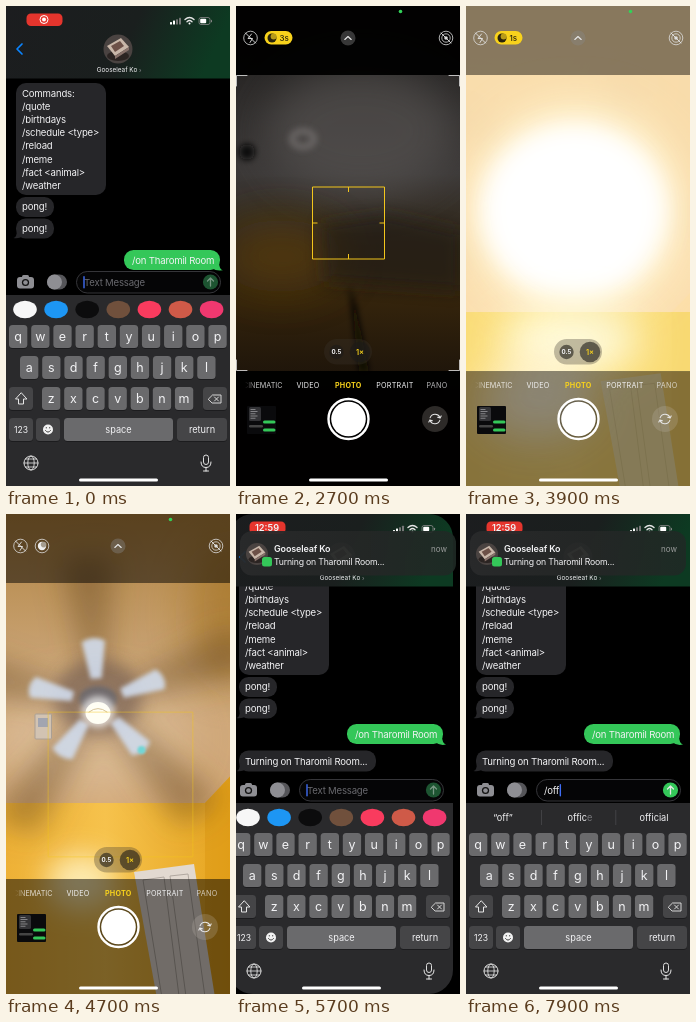
An HTML page for the animation above (8 s loop, 224 px wide and 480 px high).

```html
<!DOCTYPE html>
<html lang="en">
<head>
<meta charset="utf-8">
<title>Remote light switch</title>
<style>
html, body { margin: 0; width: 100%; height: 100%; overflow: hidden; background: #000; }
svg { display: block; width: 100vw; height: 100vh; }
text { font-family: Inter, Roboto, "Liberation Sans", sans-serif; fill: #f2f2f4; white-space: pre; }
.mid { text-anchor: middle; }
.body { font-size: 9.6px; letter-spacing: -.2px; }
.line { fill: none; stroke: #e6e6e6; stroke-linecap: round; stroke-linejoin: round; }
</style>
</head>
<body>
<svg id="stage" viewBox="0 0 224 480" preserveAspectRatio="none"></svg>
<script>
const LOOP = 8000, GAP = 239;
const DEVICE = 'Gooseleaf Ko', ROOM = 'Tharomil Room';
const $ = id => document.getElementById(id);

const rect = (x, y, w, h, r, fill, more = '') =>
  `<rect x="${x}" y="${y}" width="${w}" height="${h}" rx="${r}" fill="${fill}" ${more}/>`;
const oval = (x, y, rx, ry, fill, more = '') =>
  `<ellipse cx="${x}" cy="${y}" rx="${rx}" ry="${ry}" fill="${fill}" ${more}/>`;
const dot = (x, y, r, fill, more) => oval(x, y, r, r, fill, more);
const soft = (x, y, rx, ry, fill, blur, alpha = 1) =>
  oval(x, y, rx, ry, fill, `filter="url(#b${blur})" opacity="${alpha}"`);
const line = (d, w = 1, more = '') => `<path class="line" d="${d}" stroke-width="${w}" ${more}/>`;
const text = (x, y, s, size, more = '') => `<text x="${x}" y="${y}" font-size="${size}" ${more}>${s}</text>`;
const mid = (x, y, s, size, more = '') => text(x, y, s, size, `class="mid" ${more}`);
const body = (x, y, s, more = '') => text(x, y, s, 9.6, `class="body" ${more}`);
const group = (id, inner, more = '') => `<g id="${id}" ${more}>${inner}</g>`;
const homeBar = rect(73, 472.5, 79, 3, 1.5, '#fff');

// Messages
const GREY = '#262629', GREEN = '#34c759';

const photo = (x, y, s) => `<g transform="translate(${x} ${y}) scale(${s})">
  ${dot(0, 0, 14.5, '#4a4341')}${oval(0, 7, 11, 5, '#2b2422')}
  <path d="M-11-3L3-11 11-2-3 7Z" fill="#c9b7a9"/><path d="M-7-3L2-8 6-3-3 3Z" fill="#6d5148"/>
  <path d="M-3 7L11-2V1L-3 10Z" fill="#87716a"/></g>`;

function messages() {
  const commands = ['Commands:', '/quote', '/birthdays', '/schedule &lt;type&gt;', '/reload', '/meme',
    '/fact &lt;animal&gt;', '/weather'];
  const tail = (y) => `<path d="M11 ${y - 8}Q11 ${y - 1} 7.5 ${y}Q14 ${y + 1} 18 ${y - 3}Z" fill="${GREY}"/>`;
  return rect(10, 77, 90, 112, 10, GREY)
    + commands.map((c, i) => body(16, 90.5 + 13.2 * i, c)).join('')
    + rect(10, 191, 38, 20, 9.5, GREY) + body(16, 204, 'pong!')
    + rect(10, 212.5, 38, 20, 9.5, GREY) + tail(232) + body(16, 225.5, 'pong!')
    + group('sent', rect(118, 238, 96, 20, 9.5, GREEN)
      + `<path d="M213 250Q213 257 217 258.500Q211 260 206 256Z" fill="${GREEN}"/>` + body(126, 251.5, `/on ${ROOM}`))
    + group('reply', rect(10, 264.5, 137, 21, 9.5, GREY) + tail(285) + body(16, 278.5, `Turning on ${ROOM}...`));
}

const status = group('recIcon', dot(38, 13.5, 4, 'none', 'stroke="#fff"') + dot(38, 13.5, 2, '#fff'))
  + group('clock', mid(38, 17, '12:59', 9.2, 'font-weight="600"'));

const header = rect(0, 0, 224, 72.5, 0, 'url(#head)')
  + rect(20.5, 7.5, 36, 12.5, 4.5, '#e5352d') + status
  + [0, 1, 2, 3].map(i => rect(164 + i * 3, 16 - i * 1.4, 2, 2.4 + i * 1.4, .5, i < 2 ? '#fff' : '#777')).join('')
  + line('M179 13.500Q183.500 9.500 188 13.500', 1.4) + line('M181 15.700Q183.500 13.500 186 15.700', 1.4) + dot(183.5, 17.5, 1, '#fff')
  + rect(193, 11.5, 11, 7, 2, 'none', 'stroke="#888" stroke-width=".8"') + rect(194.2, 12.7, 6, 4.6, 1, '#fff') + rect(205, 13.7, 1, 2.6, .5, '#888')
  + line('M16 38L11 43 16 48', 1.7, 'style="stroke:#0a84ff"') + photo(112, 43, 1)
  + mid(111, 66.3, DEVICE, 6.4) + text(133, 66, '›', 6.4, 'style="fill:#8e8e93"');

const input = rect(0, 264.5, 224, 25, 0, '#000')
  + rect(11, 271, 17, 11.5, 3, '#8e8e93') + rect(16, 269, 7, 4, 1.5, '#8e8e93') + dot(19.5, 276.5, 3.6, '#111') + dot(19.5, 276.5, 2.3, '#8e8e93')
  + rect(41, 268.5, 20, 15, 7.5, '#555559') + dot(48.5, 276, 7.5, '#8e8e93')
  + rect(70.5, 265.5, 144, 21.5, 10.7, '#050506', 'stroke="#3c3c40" stroke-width=".9"')
  + body(78, 279.7, 'Text Message', 'id="hint" style="fill:#69696e"') + body(78, 279.7, '', 'id="typed"')
  + rect(77, 270, 1.4, 12.5, .7, '#3f6df5', 'id="caret"')
  + dot(204.5, 276, 7.6, GREEN, 'id="send"') + line('M204.500 280V272.300M201.500 275L204.500 272 207.500 275', 1.3, 'id="arrow"');

// Keyboard
const LIGHT = '#6a6a6c', DARK = '#454547';
const key = (x, y, w, fill, label = '', size = 9) =>
  rect(x, y + .8, w, 23, 3.5, '#18181a') + rect(x, y, w, 23, 3.5, fill) + mid(x + w / 2, y + 11.5 + size * .35, label, size);
const row = (chars, x, y, pitch = 22.15, w = 18.4) =>
  [...chars].map((c, i) => key(x + i * pitch, y, w, LIGHT, c === '&' ? '&amp;' : c, 12.5)).join('');

const letters = row('qwertyuiop', 3, 319) + row('asdfghjkl', 14, 350) + row('zxcvbnm', 36, 381)
  + key(3, 381, 24, DARK) + line('M15 387L9.500 393H12.500V398H17.500V393H20.500Z') + key(3, 412, 24, DARK, '123', 8.6);
const symbols = row('1234567890', 3, 319) + row('-/:;()$&@”', 3, 350) + row('.,?!’', 36, 381, 31.5, 27)
  + key(3, 381, 24, DARK, '#+=', 7.5) + key(3, 412, 24, DARK, 'ABC', 8.6);
const sharedKeys = key(197, 381, 24, DARK) + line('M202.500 393L206.500 389H215V397H206.500ZM208.500 391L212.500 395M212.500 391L208.500 395', .9)
  + key(30, 412, 24, DARK) + dot(42, 423.5, 5, '#f2f2f2') + line('M39.500 424.500Q42 428 44.500 424.500M40.300 421.500V422M43.700 421.500V422', 1, 'style="stroke:#444"')
  + key(58, 412, 109, LIGHT, 'space', 9.2) + key(171, 412, 50, DARK, 'return', 9.2);

const strip = ['#f7f7f7', '#1d96f4', '#0c0c0d', '#70503c', '#f93b5e', '#cf5a48', '#f0386f']
  .map((c, i) => oval(19 + i * 31.1, 303.5, 11.8, 8.7, c)).join('');
const hints = mid(37, 306.5, '“off”', 9.2) + mid(114, 306.5, 'offic<tspan fill="#77777a">e</tspan>', 9.2) + mid(188, 306.5, 'official', 9.2)
  + rect(75, 296, .7, 15, 0, '#4d4d50') + rect(149.5, 296, .7, 15, 0, '#4d4d50');

const keyboard = rect(0, 289, 224, 191, 0, '#2a2a2c') + group('strip', strip) + group('hints', hints)
  + group('letters', letters) + group('symbols', symbols) + sharedKeys + group('popup', '')
  + dot(25, 457, 7, 'none', 'stroke="#ddd"') + oval(25, 457, 3.2, 7, 'none', 'stroke="#ddd" stroke-width=".9"')
  + line('M18 457H32M19.500 453H30.500M19.500 461H30.500', .8)
  + rect(197.5, 449, 5, 9.5, 2.5, 'none', 'stroke="#ddd"') + line('M195 456Q195 461.500 200 461.500T205 456M200 461.500V465M197.500 465H202.500');

function popup(c, x, y) {
  return `<path fill="#6f6f71" d="M${x - 9} ${y + 23}V${y + 4}C${x - 9} ${y - 4} ${x - 16} ${y - 4} ${x - 16} ${y - 10}V${y - 31}
    q0-6 6-6h20q6 0 6 6V${y - 10}C${x + 16} ${y - 4} ${x + 9} ${y - 4} ${x + 9} ${y + 4}V${y + 23}Z"/>` + mid(x, y - 13, c, 21);
}

// Camera
const blades = (r1, r2, w1, w2) => [0, 1, 2, 3, 4].map(i =>
  `<path transform="rotate(${i * 72})" d="M${r1} ${-w1}L${r2 - 4} ${-w2}Q${r2 + 3} 0 ${r2 - 4} ${w2}L${r1} ${w1}Z"/>`).join('');
const tilted = inner => `<g transform="translate(92 188) scale(1.08 .98)">${inner}</g>`;

const darkScene = rect(-20, 0, 264, 480, 0, 'url(#night)')
  + soft(125, 125, 95, 65, '#5a5654', 20, .6) + soft(45, 250, 62, 36, '#5a3d10', 20, .7)
  + `<path d="M85 218L150 208 224 225V285L88 275Z" fill="#211a16" filter="url(#b8)" opacity=".6"/>`
  + oval(67, 133, 11, 8, 'none', 'stroke="#7a7674" stroke-width="6" filter="url(#b3)" opacity=".7"')
  + soft(11, 146, 8, 8, '#0b0a0a', 3)
  + `<path d="M113 278L120 300 133 366H123Z" fill="#0b0806" filter="url(#b3)"/>`;

const room = rect(-40, -60, 310, 600, 0, 'url(#ceiling)') + soft(228, 100, 45, 75, '#a06d17', 20, .55)
  + soft(85, 225, 100, 55, '#e0c3a0', 20, .65)
  + `<path d="M-40 289H199L270 214V560H-40Z" fill="url(#wall)"/><path d="M199 289L270 214V560H199Z" fill="#dc9812" opacity=".5"/>`
  + soft(75, 368, 34, 28, '#fff3c4', 14, .85)
  + `<path d="M128 358L188 350 210 490H152Z" fill="#e2d9d0"/><path d="M137 366L158 363 174 490H157ZM164 362L182 360 200 490H181Z" fill="none" stroke="#b1a8a0"/>`;
const vent = rect(29, 200, 16.5, 25, 1, '#d2c3b2', 'stroke="#aa9f94"') + rect(32, 204, 10, 9, 0, '#a2a5b0');
const shadows = tilted(group('shade', blades(20, 150, 8, 24), 'fill="#5c3d14" opacity=".42" filter="url(#b14)"'))
  + soft(92, 183, 44, 38, '#5d4a45', 8, .5) + vent;
const fan = tilted(group('blades', blades(24, 66, 5, 11), 'fill="#d2def0" opacity=".88" filter="url(#b2)"'))
  + soft(92, 185, 19, 13, '#706a6c', 2) + soft(92, 198, 17, 16, '#fff', 3, .65) + oval(92, 199, 12.5, 11, '#fffef4')
  + line('M83 198Q92 191 101 198', 1, 'style="stroke:#d7c49a"') + soft(135.5, 236, 4, 4, '#72d6d6', 1);
const glow = rect(0, 0, 224, 306, 0, '#fee4b4', 'opacity=".93"') + rect(0, 306, 224, 174, 0, '#fce48a', 'opacity=".68"')
  + soft(110, 205, 105, 108, '#fff2cc', 20) + soft(108, 202, 88, 78, '#fff', 14) + soft(108, 208, 86, 84, '#fff', 14)
  + rect(0, 306, 224, 60, 0, '#fce684', 'opacity=".45"')
  + soft(104, 335, 70, 34, '#fffbdc', 20) + soft(70, 395, 60, 42, '#fff6e4', 20, .75);

const litScene = group('room', room) + group('shadows', shadows) + rect(0, 0, 224, 480, 0, '#000', 'id="dim"')
  + group('fan', fan) + group('glow', glow);

const focus = group('focus', '<path d="M-36-36H36V36H-36Z" vector-effect="non-scaling-stroke"/>'
  + '<path id="ticks" d="M0-36V-31M0 36V31M-36 0H-31M36 0H31"/>', 'fill="none" stroke="#f3c61c"');
const off = (x, inner) => dot(x, 32, 6.8, 'none', 'stroke="#ddd" stroke-width=".8"') + inner + line(`M${x - 5} 27L${x + 5} 37`, .9);
const mode = (x, s, more = '') => mid(x, 381.6, s, 7.2, `letter-spacing=".25" ${more}`);

const camera = rect(0, 0, 224, 480, 0, '#000') + group('dark', darkScene) + group('lit', litScene)
  + group('bars', rect(0, 0, 224, 69, 0, '#000') + rect(0, 365, 224, 115, 0, '#000'))
  + group('corners', line('M.5 80V69.500H11M213 69.500H223.500V80M.5 354V364.500H11M213 364.500H223.500V354', .8)) + focus
  + off(14.5, line('M15.500 28L12 32.500H16.500L14 36.500', .9))
  + group('badge', rect(28.5, 25, 28, 13.5, 6.7, '#f8d21c') + dot(36, 32, 4.5, '#28230c') + dot(37.6, 30.6, 3, '#b89b18') + text(43.5, 35, '', 8, 'id="secs" style="fill:#28230c" font-weight="500"'))
  + group('moon', dot(36, 32, 6.8, 'none', 'stroke="#ddd" stroke-width=".8"') + dot(36, 32, 4.2, '#eee') + dot(37.6, 30.6, 2.8, '#a59d90'))
  + dot(112, 32, 7.5, '#888', 'opacity=".4"') + line('M108.800 33.500L112 30.500 115.200 33.500', 1.1)
  + off(210, dot(210, 32, 4.2, 'none', 'stroke="#ddd" stroke-width=".8"') + dot(210, 32, 1.8, '#ddd')) + dot(164.5, 5.5, 1.8, '#32d158')
  + rect(88, 333, 48, 25.5, 12.7, '#3c3630', 'opacity=".32"') + dot(100.5, 346, 7.2, '#1c1a18', 'opacity=".6"') + dot(124, 346, 10.3, '#1c1a18', 'opacity=".6"')
  + mid(100.5, 348.3, '0.5', 6.2, 'font-weight="700"') + mid(124, 348.6, '1×', 7.4, 'style="fill:#f8d21c" font-weight="600"')
  + text(46.5, 381.6, 'CINEMATIC', 7.2, 'text-anchor="end" style="fill:url(#fadeIn)"')
  + mode(72, 'VIDEO') + mode(112.3, 'PHOTO', 'style="fill:#f8d21c" font-weight="700"') + mode(159, 'PORTRAIT') + mode(201, 'PANO', 'opacity=".75"')
  + dot(112.5, 413, 20, '#000', 'fill-opacity=".25" stroke="#fff" stroke-width="2.4"') + dot(112.5, 413, 17.3, '#fff')
  + rect(11, 400, 29, 28, 1, '#0a0a0c') + rect(13, 401, 12, 14, 1.5, '#333336')
  + [0, 1, 2, 3, 4].map(i => rect(14.5, 403 + i * 2.2, 5 + i * 2 % 4, .8, 0, '#99999c')).join('')
  + rect(27, 414.5, 12.5, 3, 1.5, GREEN) + rect(13, 419, 14, 2.5, 1.2, '#444') + rect(27, 422.5, 12.5, 3, 1.5, GREEN)
  + dot(199, 413, 13, '#c8c0b8', 'opacity=".22"')
  + '<g transform="translate(199 413) scale(.88)">' + line('M-5.500-1.500A6 6 0 0 1 5.500-2M5.500 1.500A6 6 0 0 1-5.500 2M3-2L5.800-1 7-3.500M-3 2L-5.800 1-7 3.500', 1.2) + '</g>'
  + homeBar;

const banner = group('banner', rect(4, 17, 216, 44.5, 12, 'url(#note)') + photo(21, 40, .76) + rect(26, 43, 10, 9.5, 2.5, GREEN)
  + text(38, 38.3, DEVICE, 9, 'font-weight="600" letter-spacing="-.15"') + text(38, 50.6, `Turning on ${ROOM}...`, 8.7, 'letter-spacing="-.2"')
  + text(211, 38, 'now', 8, 'text-anchor="end" style="fill:#9a9c9b"'));

const blur = n => `<filter id="b${n}" x="-60%" y="-60%" width="220%" height="220%"><feGaussianBlur stdDeviation="${n}"/></filter>`;
const grad = (id, dir, ...stops) => `<linearGradient id="${id}" x1="0" y1="0" ${dir}>` + stops.map(([o, c, a = 1]) =>
  `<stop offset="${o}" stop-color="${c}" stop-opacity="${a}"/>`).join('') + '</linearGradient>';
const ACROSS = 'x2="1" y2="0"', DOWN = 'x2="0" y2="1"';

$('stage').innerHTML = `<defs>${[1, 2, 3, 8, 14, 20].map(blur).join('')}
  ${grad('head', 'x2="1" y2=".15"', [0, '#1c1d1f'], [.6, '#1a1f1e'], [1, '#0d3a22'])}
  ${grad('note', ACROSS, [0, '#292a2b', .96], [.6, '#242726', .94], [1, '#1f2a25', .9])}
  ${grad('night', DOWN, [.1, '#262423'], [.35, '#3c3938'], [.5, '#2f2516'], [.62, '#33230c'], [.8, '#1a120a'])}
  ${grad('ceiling', DOWN, [.1, '#b5843d'], [.22, '#bd935a'], [.38, '#cda87c'], [.58, '#d2a877'])}
  ${grad('wall', ACROSS, [.13, '#eeb136'], [.45, '#f6c24c'], [.85, '#e6a41f'])}
  ${grad('fadeIn', ACROSS, [.05, '#fff', 0], [.35, '#fff', .8])}
  <clipPath id="card"><rect id="cardShape" width="224" height="480"/></clipPath></defs>`
  + rect(0, 0, 224, 480, 0, '#000')
  + group('chat', rect(0, 0, 224, 480, 0, '#000') + group('list', messages()) + header + input + keyboard + homeBar, 'clip-path="url(#card)"')
  + group('cam', camera, 'clip-path="url(#card)"') + banner;

// Motion
const at = (t, ...keys) => {
  if (t <= keys[0][0]) return keys[0][1];
  for (let i = 1; i < keys.length; i++) {
    const [t0, a] = keys[i - 1], [t1, b] = keys[i];
    if (t < t1) return a + (b - a) * (t - t0) / (t1 - t0);
  }
  return keys[keys.length - 1][1];
};
const set = (id, name, v) => $(id).setAttribute(name, v);
const move = (id, x, y) => set(id, 'transform', `translate(${x} ${y})`);
const show = (id, on) => set(id, 'opacity', +on);

function drawChat(t) {
  const back = t >= 5600, typed = t < 6700 ? '' : '/off'.slice(0, t < 7500 ? 1 : t < 7700 ? 2 : t < 7900 ? 3 : 4);
  move('list', 0, back ? -28 : 0);
  move('sent', 0, t < 100 ? 6 : 0);
  show('reply', back);
  show('recIcon', !back);
  show('clock', back);
  $('typed').textContent = typed;
  show('hint', !typed);
  set('caret', 'x', typed ? 78.5 + $('typed').getComputedTextLength() : 77.3);
  set('send', 'fill', typed ? GREEN : '#1d5431');
  show('arrow', typed ? 1 : .45);
  show('strip', !typed);
  show('hints', !!typed);
  const nums = t >= 6300 && t < 7100;
  show('symbols', nums);
  show('letters', !nums);
  $('popup').innerHTML = t >= 6500 && t < 6700 ? popup('/', 34.4, 350)
    : t >= 7300 && t < 7500 ? popup('o', 189.4, 319)
    : t >= 7500 && t < 7700 ? popup('f', 89.6, 350) : '';
}

function drawCamera(t) {
  const lit = t >= 3700, p = Math.min((t - 4700) / 600, 1.3);
  show('lit', lit);
  show('dark', !lit);
  show('corners', !lit);
  move('dark', 3 * Math.sin((t - 2700) / 500), 2 * Math.sin((t - 2700) / 350));
  const drop = -13 * Math.min(p, 0);
  move('room', -5 * p, drop);
  for (const id of ['shadows', 'fan']) move(id, -12 * Math.max(p, -.7), Math.max(2 * p, 0) + drop / 2);
  const spin = `rotate(${-94 + (t - 4700) * 194 / 600})`;
  set('blades', 'transform', spin);
  set('shade', 'transform', spin);
  show('glow', at(t, [3900, 1], [4100, .8], [4700, 0]));
  show('dim', at(t, [4700, 0], [5300, .28]));
  show('bars', lit ? at(t, [3900, .45], [4700, .5], [5300, .66]) : .95);

  const night = t >= 1300 && t < 4300;
  show('badge', night);
  show('moon', !night);
  $('secs').textContent = t < 3900 ? '3s' : '1s';

  const small = t >= 2300 && t < 3300, big = t >= 4300 && t < 5100;
  show('focus', small ? at(t, [2900, 1], [3300, .4]) : big ? at(t, [4500, .6], [5100, .15]) : 0);
  show('ticks', small);
  set('focus', 'transform', big ? 'translate(114.5 270.5) scale(2.01)' : `translate(112.5 217) scale(${at(t, [2300, 1.4], [2500, 1])})`);
}

function draw(ms) {
  // The picture steps five times a second.
  const t = ms < 100 ? 0 : Math.floor((ms - 100) / 200) * 200 + 100;
  const first = t < 3000;
  const slide = first ? at(t, [300, 0], [500, 70], [700, 215], [900, GAP])
    : at(t, [5100, 0], [5300, 22], [5500, 160], [5700, 232], [5900, GAP]);
  move('chat', first ? slide : slide - GAP, 0);
  move('cam', first ? slide - GAP : slide, 0);
  set('cardShape', 'rx', slide > 0 && slide < GAP ? 24 : 0);
  move('banner', 0, at(t, [5100, -62], [5300, -32], [5500, 0]));
  drawChat(t);
  drawCamera(t);
}

const start = performance.now();
function tick() {
  draw((performance.now() - start) % LOOP);
  requestAnimationFrame(tick);
}
tick();
</script>
</body>
</html>
```
